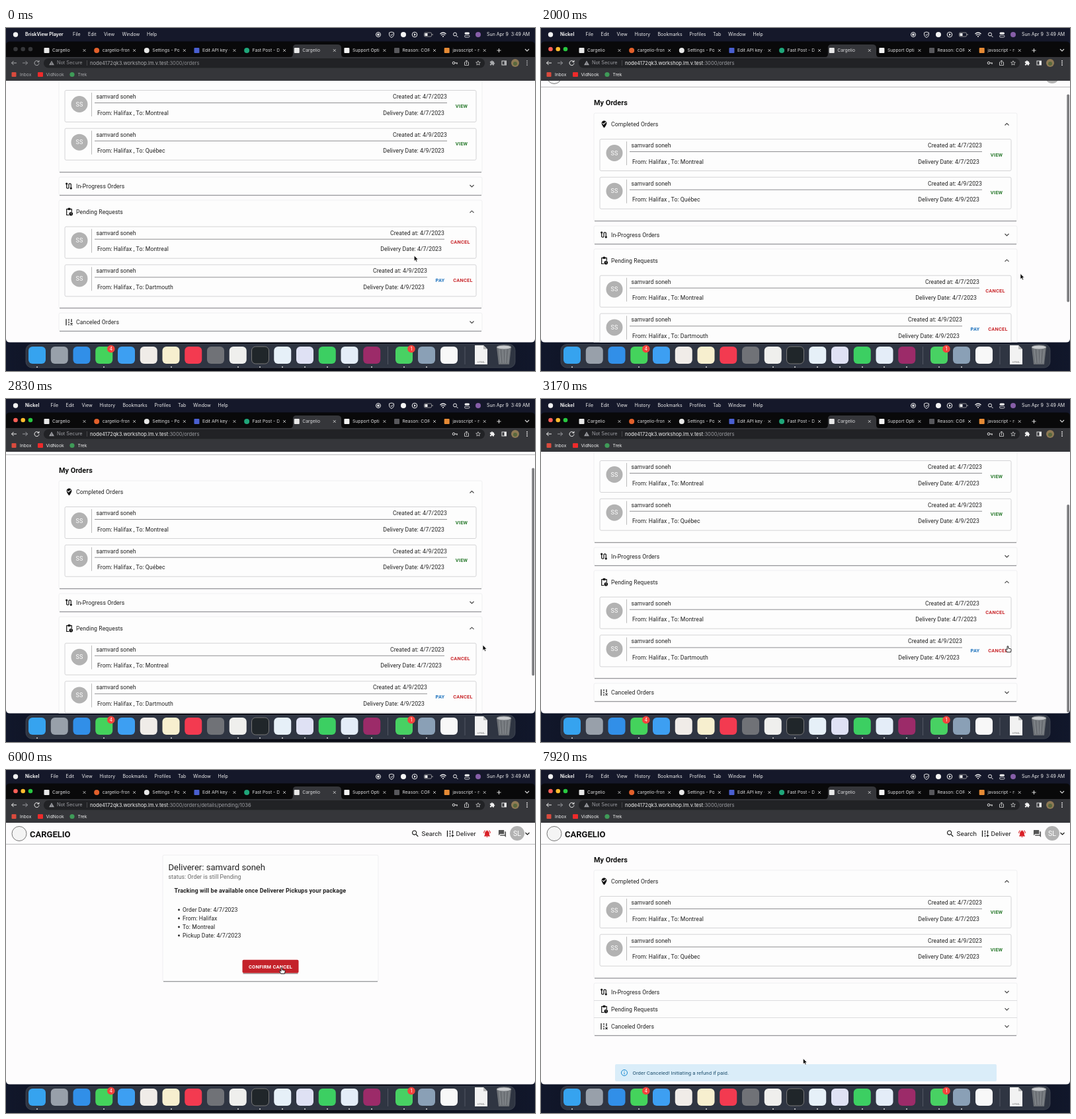
Recreate the animation shown at these times as an HTML page. Size 800 by 520 pixels, loop 8 s.

```html
<!DOCTYPE html>
<html lang="en">
<head>
<meta charset="utf-8">
<title>Orders</title>
<style>
html, body { margin: 0; width: 100%; height: 100%; overflow: hidden; background: #0b0d16; }
svg { display: block; }
#stage { --bar: #35363a; --ink: #f1f1f1; --dim: #9b9ca1; font-family: Roboto, sans-serif; }
#stage.idle { --ink: #a9aaad; --dim: #8c8d91; }
.ui { font-family: Inter, sans-serif; }
.lights .idleDot, .idle .lights .liveDot { display: none; }
.idle .lights .idleDot { display: inline; }
</style>
</head>
<body>
<svg id="stage" width="800" height="520" viewBox="0 0 800 520" xmlns="http://www.w3.org/2000/svg"></svg>
<script>
const COMPANY = 'Cargelio', PERSON = 'samvard soneh', HOST = 'node4172qk3.workshop.lm.v.test';

// Drawing helpers
const text = (x, y, s, o = {}) => {
  const { size = 8.7, fill = '#222', weight = 400, anchor = 'start', space = .07, cls = '' } = o;
  return `<text class="${cls}" x="${x}" y="${y}" font-size="${size}" font-weight="${weight}" letter-spacing="${space}" text-anchor="${anchor}" style="fill:${fill}">${s}</text>`;
};
const ui = (x, y, s, o = {}) => text(x, y, s, { size: 7, fill: '#eee', space: 0, cls: 'ui', ...o });
const rect = (x, y, w, h, fill, r = 0, extra = '') => `<rect x="${x}" y="${y}" width="${w}" height="${h}" rx="${r}" style="fill:${fill}" ${extra}/>`;
const circle = (x, y, r, fill, extra = '') => `<circle cx="${x}" cy="${y}" r="${r}" style="fill:${fill}" ${extra}/>`;
const line = (d, color = 'var(--ink)', w = 1) => `<path d="${d}" style="fill:none;stroke:${color}" stroke-width="${w}"/>`;
const at = (x, y, s, k = 1) => `<g transform="translate(${x} ${y}) scale(${k})">${s}</g>`;
const icon = (x, y, d, fill = '#111', k = .5556) =>
  at(x, y, `<path transform="translate(-12 -12)" d="${d}" style="fill:${fill}" fill-rule="evenodd"/>`, k);
const group = (id, s) => `<g id="${id}">${s}</g>`;

const PIN = 'M12 2C8.1 2 5 5.1 5 9c0 5.2 7 13 7 13s7-7.8 7-13c0-3.9-3.1-7-7-7zm-1.5 11.5-4-4 1.4-1.4 2.6 2.6 5.6-5.6 1.4 1.4z';
const LENS = 'M15.5 14h-.8l-.3-.3A6.5 6.5 0 1 0 13.7 14.4l.3.3v.8l5 5 1.5-1.5zM9.5 14a4.5 4.5 0 1 1 0-9 4.5 4.5 0 0 1 0 9z';
const CHAT = 'M21 6h-2v9H6v2q0 1 1 1h11l4 4V7q0-1-1-1zM17 12V3q0-1-1-1H3Q2 2 2 3v14l4-4h10q1 0 1-1z';
const BELL = 'M18 11c0-3.1-1.6-5.6-4.5-6.3V4a1.5 1.5 0 0 0-3 0v.7C7.6 5.4 6 7.9 6 11v5l-2 2v1h16v-1l-2-2zM10 20h4a2 2 0 0 1-4 0zM7.6 4.1 6.2 2.7A10 10 0 0 0 2 10.5h2a8 8 0 0 1 3.6-6.4zM20 10.5h2a10 10 0 0 0-4.2-7.8l-1.4 1.4A8 8 0 0 1 20 10.5z';
const WARN = 'M1 21h22L12 2zM11 16h2v2h-2zM11 10h2v4h-2z';
const STAR = 'M12 3l2.6 6.2 6.7.5-5.1 4.4 1.6 6.5L12 17.1l-5.8 3.5 1.6-6.5-5.1-4.4 6.7-.5z';
const PUZZLE = 'M20 11h-1V7q0-2-2-2h-4V4a2.5 2.5 0 0 0-5 0v1H4Q2 5 2 7v4h1.5a2.5 2.5 0 0 1 0 5H2v4q0 2 2 2h4v-1.5a2.5 2.5 0 0 1 5 0V22h4q2 0 2-2v-4h1a2.5 2.5 0 0 0 0-5z';

const chevron = (x, y, up, color = '#444') => line(up ? `M${x - 3} ${y + 1.5}l3-3 3 3` : `M${x - 3} ${y - 1.5}l3 3 3-3`, color, 1.1);
const route = (x, y) => at(x, y, line('M-3.3-3V2.8a2.2 2.2 0 0 0 3.3 0V-2.8a2.2 2.2 0 0 1 3.3 0V3', '#111', 1.2) + circle(-3.3, -3.5, 1.6, '#111') + circle(3.3, 3.5, 1.6, '#111'));
const clipboard = (x, y) => at(x, y, line('M0 4.8H-3.8V-4.2H3.8V0M-2-3.5H2', '#111', 1.2) + rect(-2, -6, 4, 3, '#111', 1) + circle(2.8, 3, 2.8, '#111') + line('M2.8 1.3V3.2L4 4.2', '#fff', .6));
const sliders = (x, y, mark) => at(x, y, line('M-4.5-4.8V4.8M-.5-4.8v2.6M-.5-1v2.2M-.5 2.4v2.4M3.5-4.8V0', '#111', 1.2) + line(mark, '#111', 1.1));
const CROSS = 'M2 1.5l3 3m0-3l-3 3', PLUS = 'M1.5 3h4m-2-2v4';

// Web page
const paper = (x, y, w, h) => rect(x, y, w, h, '#fdfdfd', 2, 'stroke="#efeff1"') +
  line(`M${x + 1} ${y + h + .5}h${w - 2}`, '#98989b') + line(`M${x + 1} ${y + h + 1.5}h${w - 2}`, '#e4e4e6');
const summary = (y, glyph, title, open) => glyph + text(106, y + 3.1, title) + chevron(704.5, y, open);
const button = (x, y, label, color) => text(x, y + 2.7, label, { size: 7.4, weight: 600, fill: color, anchor: 'middle', space: .25 });
const avatar = (x, y, r, s, size) => circle(x, y, r, '#b2b2b2') + text(x, y + size * .36, s, { size, fill: '#fff', anchor: 'middle' });
const RED = '#c92a2e', GREEN = '#2e7d32', BLUE = '#1d72bd';

function order(y, city, date, right, buttons) {
  return rect(89, y + .5, 622, 48, '#fdfdfd', 2, 'stroke="#d4d4d6"') +
    avatar(111, y + 21.5, 12.5, 'SS', 9) + line(`M129.5 ${y + 4}v36`, '#bbb') +
    text(136.5, y + 13, PERSON) + text(right, y + 13, `Created at: ${date}`, { anchor: 'end' }) +
    line(`M134 ${y + 19.5}H${right}`, '#8f8f92') +
    text(138, y + 37.5, `From: Halifax , To: ${city}`) +
    text(right - 4, y + 37.5, `Delivery Date: ${date}`, { anchor: 'end' }) +
    buttons.map(([x, label, color]) => button(x, y + 24, label, color)).join('');
}

const header = circle(20, 96.5, 11, '#f4f4f4', 'stroke="#555" stroke-width=".8"') +
  text(36, 101.5, COMPANY.toUpperCase(), { size: 13, weight: 600, fill: '#111', space: 0 }) +
  icon(619, 96.5, LENS) + text(628.5, 100, 'Search', { size: 9.8, fill: '#111' }) +
  sliders(672, 96.5, PLUS) + text(680.5, 100, 'Deliver', { size: 9.8, fill: '#111' }) +
  icon(727.5, 96.5, BELL, '#d91f26') + icon(750.5, 96.5, CHAT, '#555') +
  avatar(773, 96, 11, 'SL', 10.5) + chevron(788.5, 96.5, false, '#111') +
  line('M0 112.5H800', '#b9b9bb');

const completed = text(80, 139.5, 'My Orders', { size: 10.9, weight: 700, fill: '#111', space: 0 }) +
  paper(80, 152, 640, 163) + summary(169, icon(95.5, 169, PIN), 'Completed Orders', true) +
  order(191, 'Montreal', '4/7/2023', 667, [[689, 'VIEW', GREEN]]) +
  order(248.7, 'Québec', '4/9/2023', 667, [[689, 'VIEW', GREEN]]);
const inProgress = summary(336.5, route(95, 336.5), 'In-Progress Orders');
const pending = (y, open) => summary(y, clipboard(95.5, y), 'Pending Requests', open);
const canceled = y => summary(y, sliders(95.5, y, CROSS), 'Canceled Orders');

const openLists = paper(80, 323, 640, 27) + inProgress + paper(80, 358, 640, 163) + pending(375.7, true) +
  order(397.7, 'Montreal', '4/7/2023', 663, []) +
  group('ripple', rect(669, 402, 38, 39, '#fcecec', 2) + '<circle id="wave" cx="688" cy="421" style="fill:#f3b7b7"/>') +
  button(687, 421.7, 'CANCEL', RED) +
  order(455.4, 'Dartmouth', '4/9/2023', 637, [[656.5, 'PAY', BLUE], [691, 'CANCEL', RED]]) +
  paper(80, 529, 640, 27) + canceled(543);
const closedLists = paper(80, 323, 640, 79) + line('M80 349.5H720M80 375.5H720', '#dcdcde') +
  inProgress + pending(362.7) + canceled(388.7);

const facts = ['Order Date: 4/7/2023', 'From: Halifax', 'To: Montreal', 'Pickup Date: 4/7/2023'];
const details = paper(237, 129, 326, 191) +
  text(245.5, 151.5, `Deliverer: ${PERSON}`, { size: 13.1, space: 0 }) +
  text(245.5, 165.2, 'status: Order is still Pending', { fill: '#666' }) +
  text(254.5, 186, 'Tracking will be available once Deliverer Pickups your package', { size: 9, weight: 700, space: .1 }) +
  facts.map((s, i) => circle(261.5, 212 + 13 * i, 1.4, '#222') + text(267, 215 + 13 * i, s)).join('') +
  line('M358.5 308.5h83', '#999', 1.6) + rect(357.5, 287.8, 85, 20, '#c4222a', 2) + button(400, 298, 'CONFIRM CANCEL', '#fff');

const alertBox = rect(112, 446, 577, 26, '#daedf9', 2) +
  circle(126, 459, 4.5, 'none', 'stroke="#1688cf"') + line('M126 458.5v3M126 456.3v1.1', '#1688cf') +
  text(138.5, 461.8, 'Order Canceled! Initiating a refund if paid.', { size: 7.75, fill: '#1b4d6c' });

// Browser window
const tabs = [
  [COMPANY, '#e8e8e8'], ['cargelio-front', '#e2602b', 1], ['Settings - Posts', '#e8e8e8', 1], ['Edit API key - A', '#4a5fd0'],
  ['Fast Post - Dis', '#1fa67a', 1], [COMPANY, '#e8e8e8'], ['Support Options', '#f2f2f2'], ['Reason: CORS h', '#58585c'], ['javascript - rea', '#e58a35']
].map(([name, color, round], i) => {
  const x = 61.5 + 75.65 * i;
  return (i === 5 ? '<path d="M430 44q4 0 4-5V30q0-5 5-5h62q6 0 6 5v9q0 5 4 5z" style="fill:var(--bar)"/>' : '') +
    (round ? circle(x, 34, 4, color) : rect(x - 4, 30, 8, 8, color, 1)) +
    `<svg x="${x + 8.5}" y="26" width="41" height="16">${ui(0, 10.2, name, { size: 6.8, fill: '#dcdcde' })}</svg>` +
    line(`M${x + 55} 32l4 4m0-4l-4 4`, '#d8d8da', .8);
}).join('');

const lights = [['#ff5f57', 14.5], ['#febc2e', 25.7], ['#28c840', 37]].map(([c, x]) =>
  circle(x, 32, 3.3, c, 'class="liveDot"') + circle(x, 32, 3.3, '#36373a', 'class="idleDot"')).join('');

const bookmark = (x, s) => ui(x, 72.5, s, { size: 6.7, fill: 'var(--ink)' });
const toolbar = rect(0, 44, 800, 36.5, 'var(--bar)') + rect(57, 46, 667, 14.5, '#212225', 7) +
  line('M16 53H8.5m3-3l-3 3 3 3') + line('M25 53h7.5m-3-3l3 3-3 3', 'var(--dim)') +
  line('M49.3 51a3.5 3.5 0 1 0 .7 2.5M50 49v2.5h-2.5') +
  icon(69, 53, WARN, 'var(--dim)', .36) + ui(77, 55.4, 'Not Secure', { size: 7.3, fill: 'var(--dim)' }) +
  line('M122.5 49v8', '#57585b', .7) +
  `<text class="ui" x="127" y="55.5" font-size="7.6" style="fill:var(--ink)">${HOST}<tspan id="path" style="fill:var(--dim)"></tspan></text>` +
  circle(677, 53, 1.8, 'none', 'stroke="#ddd"') + line('M679 53h4m-1 0v2', '#ddd') +
  line('M695 52h-1.5v4.5h6V52H698M696.5 55v-6m-2 2l2-2 2 2', '#ddd', .8) +
  at(714, 53, `<path transform="translate(-12 -12)" d="${STAR}" fill="none" stroke="#ddd" stroke-width="2"/>`, .36) +
  icon(735.5, 53, PUZZLE, 'var(--ink)', .36) +
  rect(750, 50, 6.5, 6, 'none', 0, 'stroke="#ddd"') + rect(753.5, 50, 3, 6, 'var(--ink)') +
  circle(770, 53, 6, '#8f7a55') + circle(770, 54, 3, '#59683d') +
  [50, 53, 56].map(y => circle(788, y, .9, 'var(--ink)')).join('') +
  rect(8.5, 67, 7, 7, '#d94a3d', 1) + bookmark(21, 'Inbox') +
  rect(48, 67, 8, 7, '#ee2b2b', 1) + bookmark(60.5, 'VidNook') +
  circle(100, 70.5, 3.6, '#3f9b58') + bookmark(108.5, 'Trek');

// Desktop
const menu = (name, items) => ui(29, 12.3, name, { weight: 700 }) + items.map(([s, x]) => ui(x, 12.3, s)).join('');
const playerMenu = menu('BriskView Player', [['File', 101], ['Edit', 124], ['View', 148], ['Window', 175.5], ['Help', 213]]);
const browserMenu = menu('Nickel', [['File', 67.5], ['Edit', 90.5], ['View', 114.5], ['History', 141.5], ['Bookmarks', 176.5],
  ['Profiles', 224.5], ['Tab', 260], ['Window', 283], ['Help', 320.5]]);
const W = '#f4f4f4';
const status = circle(14.5, 10, 3.7, W) +
  circle(563, 10, 3.5, 'none', `stroke="${W}"`) + circle(563, 10, 1.8, W) +
  line('M579.5 7l3.5-1 3.5 1v3q0 3-3.5 4.5-3.5-1.5-3.5-4.5zM581.5 10l1.5 1.5 2-3', W, .9) +
  circle(601, 10, 4, W) + circle(618, 10, 3.8, 'none', `stroke="${W}"`) + `<path d="M617 8l3 2-3 2z" fill="${W}"/>` +
  rect(632.5, 7, 11, 6, 'none', 1.5, 'stroke="#aaa" stroke-width=".8"') + rect(633.5, 8, 4, 4, W) + rect(644.5, 9, 1, 2, '#aaa') +
  line('M656.5 9q4.5-4 9 0M658 11q3-2.5 6 0', W, 1.2) + circle(661, 12.8, 1, W) +
  circle(679, 9.5, 2.5, 'none', `stroke="${W}"`) + line('M681 11.5l2.5 2.5', W) +
  rect(693.5, 6.5, 7.5, 3, W, 1.5) + rect(693.5, 11, 7.5, 3, 'none', 1.5, `stroke="${W}" stroke-width=".8"`) +
  circle(714, 10, 4, '#865ea8') + ui(727, 12.3, 'Sun Apr 9&#160; 3:49 AM');

const apps = ['#36a3ef', '#98a0aa', '#318fe8', '#44d35c', '#3d9ff2', '#f0ece8', '#f7efcf', '#f33a50', '#707277', '#efefed', '#20262a',
  '#e6f0f8', '#dfe1f4', '#3ccf62', '#e4edf8', '#9c2b69', '#48d163', '#8aa0b6', '#f8f8f8'];
const badge = (x, s) => circle(x, 486.5, 5.8, '#f4433c') + ui(x, 489, s, { anchor: 'middle', fill: '#fff' });
const dock = rect(30, 479.5, 740, 35.5, '#2f3542', 9, 'stroke="#484e5b" stroke-width=".7"') +
  apps.map((c, i) => rect((i < 16 ? 47 + 33.75 * i : 602 + 34 * (i - 16)) - 13, 483, 26, 26, c, 6, c === '#20262a' ? 'stroke="#777"' : '')).join('') +
  badge(158.8, '4') + badge(613, '1') + line('M577.5 483v27M694 483v27', '#5c616d', .8) +
  '<path d="M709 481h13l6 6v23h-19z" fill="#f2f2f2"/><path d="M722 481v6h6z" fill="#bbb"/>' +
  ui(718.5, 508, 'HTML', { size: 4, anchor: 'middle', fill: '#777' }) +
  '<path d="M742 484h22l-3 26h-16z" fill="#6d7176"/>' + line('M746 487l2 21M751 487l1 21M756 487l-1 21M761 487l-2 21', '#94989c', .8) +
  '<ellipse cx="753" cy="484" rx="11" ry="3" fill="#c9cbce" stroke="#82868a"/>' +
  [47, 148, 250, 351, 384, 418, 452, 486, 519, 553, 602, 636].map(x => circle(x, 514, 1, '#ddd')).join('');

const arrow = '<path d="M0 0v8.2l1.9-1.7 1.3 2.9 1.4-.6-1.3-2.8h2.5z" fill="#000" stroke="#fff" stroke-width=".6"/>';
const hand = '<path d="M-1 0q1-1 1.8 0v3l3.5.8q1 .3 .8 1.5l-.7 3.5H-1.2L-3.5 5q0-1 1-.8l1.5 1z" fill="#fff" stroke="#111" stroke-width=".9"/>';

const stage = document.getElementById('stage');
stage.innerHTML = `<defs><clipPath id="view"><path d="M0 80H800V471q0 5.5-6 5.5H6q-6 0-6-5.5z"/></clipPath>
  <linearGradient id="wall"><stop stop-color="#11172b"/><stop offset=".3" stop-color="#0a0c14"/><stop offset=".7" stop-color="#0b0d17"/><stop offset="1" stop-color="#11172b"/></linearGradient></defs>` +
  rect(0, 0, 800, 520, 'url(#wall)') + rect(0, 0, 800, 20.5, '#15182a') +
  group('playerMenu', playerMenu) + group('browserMenu', browserMenu) + status +
  '<path d="M0 44V26q0-5.5 6-5.5H794q6 0 6 5.5V44z" style="fill:#09090a"/>' +
  `<g class="lights">${lights}</g>` + tabs + line('M742.5 34h6m-3-3v6', '#ddd') + chevron(788, 33.5, false, '#ddd') + toolbar +
  `<g clip-path="url(#view)">${rect(0, 80, 800, 398, '#fdfcfd')}` +
  group('page', header + group('orders', completed + group('open', openLists) + group('closed', closedLists)) + group('details', details)) +
  group('alert', alertBox) + group('thumb', rect(795.3, 82, 3.7, 315, '#7d7d80', 1.8)) + '</g>' +
  dock + group('pointer', group('arrow', arrow) + group('hand', hand));

// Timeline
const $ = Object.fromEntries([...stage.querySelectorAll('[id]')].map(e => [e.id, e]));
const show = (el, on) => el.style.display = on ? '' : 'none';
const clamp = v => Math.min(1, Math.max(0, v));
const LOOP = 8000, FOCUS = 1420, OPEN_DETAILS = 4420, CANCELED = 6950;
const pointerKeys = [[250, 617.3, 345], [1100, 725, 372.5], [2700, 725, 372.5], [3150, 706, 375], [3400, 706, 375], [3850, 689.7, 323],
  [4650, 689.7, 323], [5650, 417, 300], [7000, 417, 300], [7650, 396.5, 437.5]];
const scrollKeys = [[1600, 97], [2200, -2], [2400, -5], [2620, 0], [2700, 0], [3070, 97], [3170, 98], [3290, 97]];

function track(keys, t) {
  const i = keys.findIndex(k => k[0] > t);
  if (i === 0) return keys[0].slice(1);
  if (i < 0) return keys[keys.length - 1].slice(1);
  const a = keys[i - 1], b = keys[i], p = (t - a[0]) / (b[0] - a[0]), e = p * p * (3 - 2 * p);
  return a.slice(1).map((v, n) => v + (b[n + 1] - v) * e);
}

function render(t) {
  const active = t >= FOCUS, inDetails = t >= OPEN_DETAILS && t < CANCELED, done = t >= CANCELED;
  stage.classList.toggle('idle', !active);
  show($.playerMenu, !active);
  show($.browserMenu, active);
  show($.orders, !inDetails);
  show($.details, inDetails);
  show($.open, !done);
  show($.closed, done);
  $.path.textContent = ':3000/orders' + (inDetails ? '/details/pending/1036' : '');

  const scroll = t < OPEN_DETAILS ? Math.round(track(scrollKeys, t)[0]) : 0;
  $.page.setAttribute('transform', `translate(0 ${-scroll})`);
  $.thumb.setAttribute('transform', `translate(0 ${Math.min(97, Math.max(0, scroll)) * .804})`);
  $.thumb.style.opacity = clamp((t - 1580) / 80) * clamp((3950 - t) / 250);

  show($.ripple, t >= 3800 && t < OPEN_DETAILS);
  $.wave.setAttribute('r', 19.5 * clamp((t - 4050) / 200));
  $.alert.style.opacity = clamp((t - CANCELED) / 220);

  const [x, y] = track(pointerKeys, t);
  const overConfirm = inDetails && x > 358 && x < 442 && y > 288 && y < 308;
  const pointing = overConfirm || (t > 3080 && t < 3520);
  show($.hand, pointing);
  show($.arrow, !pointing);
  $.pointer.setAttribute('transform', `translate(${x} ${y})`);
}

const start = performance.now();
(function tick() {
  render((performance.now() - start) % LOOP);
  requestAnimationFrame(tick);
})();
</script>
</body>
</html>
```
